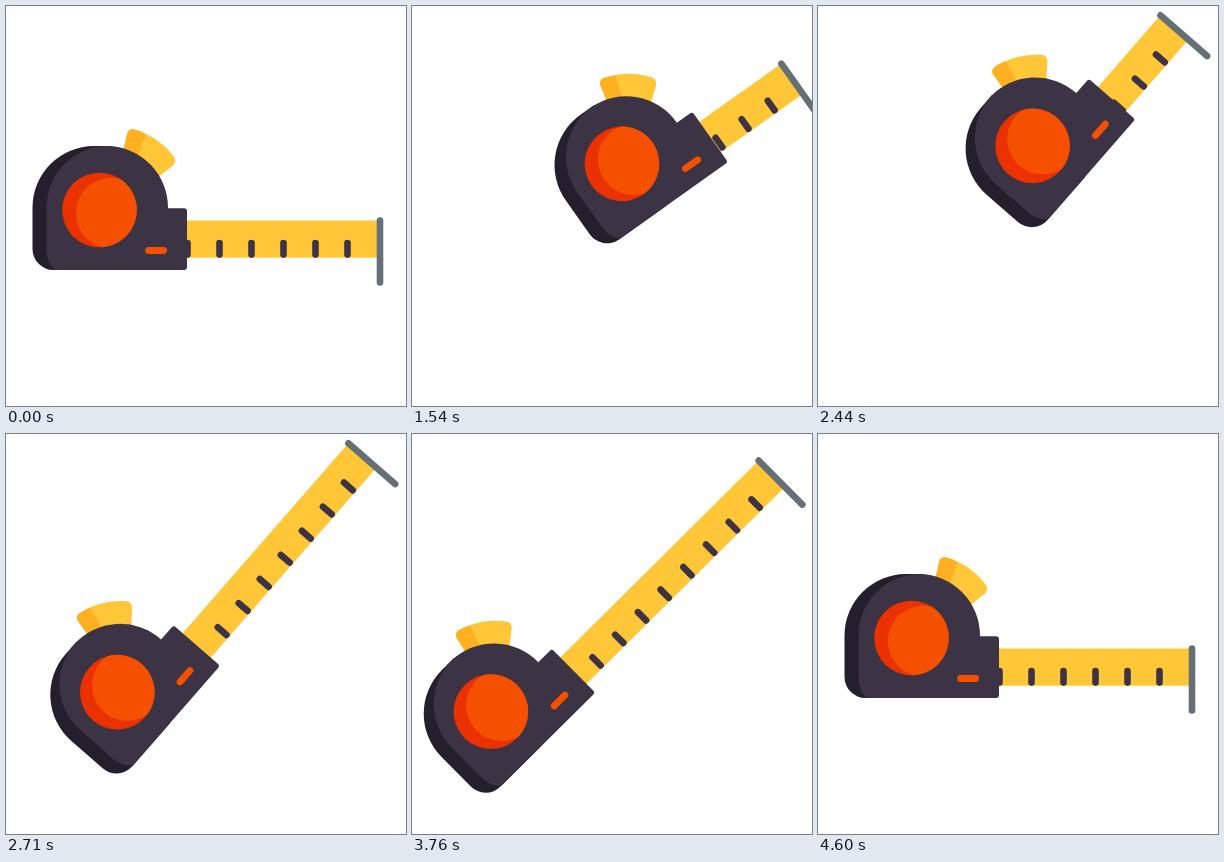
An HTML page that plays this animation: 400 by 400 pixels, repeating every 4.63 s.

```html
<!DOCTYPE html>
<html lang="en">
<head>
<meta charset="utf-8">
<title>Tape measure</title>
<style>
html, body { margin: 0; width: 100%; height: 100%; overflow: hidden; background: #fff; }
svg { display: block; width: 100vw; height: 100vh; }
.round { stroke-linecap: round; fill: none; }
</style>
</head>
<body>
<svg viewBox="0 0 400 400">
  <g id="tool">
    <rect id="tape" y="214.5" width="200" height="37.2" fill="#ffc738"/>
    <g id="ticks" class="round" stroke="#3c3345" stroke-width="6.6"></g>
    <path class="round" d="M374 214.5V276.5" stroke="#646f76" stroke-width="6.6"/>
    <g id="case">
      <path fill="#ffc738" d="M116 150L121.3 127.5Q123 122.3 128.5 123.6Q153 131 168 151Q171 155 167 159.5L150 173Z"/>
      <path fill="#ffb020" d="M116 150L121.3 127.5Q123 122.3 128.5 123.6Q134 125 139.5 128.2L132 150Z"/>
      <path fill="#231f2d" d="M26.5 201.5A61.5 61.5 0 0 1 88 140H105V264H47.5A21 21 0 0 1 26.5 243Z"/>
      <path fill="#3c3345" d="M40.5 201.5A61.5 61.5 0 0 1 101 140A61.5 61.5 0 0 1 162 202.3H178Q181 202.3 181 205.3V261Q181 264 178 264H49C44 260 40.5 253 40.5 243Z"/>
      <circle cx="93.5" cy="204" r="37.3" fill="#eb3100"/>
      <path fill="#f54f00" d="M114 172.8A35.2 35.2 0 0 0 70 207A35.2 35.2 0 0 0 96 241.2A37.3 37.3 0 0 0 114 172.8Z"/>
      <path class="round" d="M142.6 244.5H157.6" stroke="#f54f00" stroke-width="6.8"/>
    </g>
  </g>
</svg>
<script>
const $ = id => document.getElementById(id);
const tool = $('tool'), tape = $('tape'), box = $('case');
const LOOP = 4630, HOLD = 1000, STEP = 30;
const TILT = 48.9, REST = 280.5, SHORT = 152.5, LONG = 395.5;
const LOW = [374, 214], HIGH = [342, 9];

const ticks = Array.from({ length: 10 }, (_, i) => {
  const p = document.createElementNS('http://www.w3.org/2000/svg', 'path');
  const x = 341.5 - 32 * i;
  p.setAttribute('d', `M${x} 237V248.6`);
  $('ticks').append(p);
  return { p, x };
});

const mix = (a, b, f) => a + (b - a) * f;

// Bezier easing with handles (x1, 0) and (x2, 1)
function ease(n, start, x1, x2) {
  const t = Math.min(1, Math.max(0, (n - start) / 40));
  if (t === 0 || t === 1) return t;
  let lo = 0, hi = 1, u = 0.5;
  for (let i = 0; i < 30; i++) {
    u = (lo + hi) / 2;
    const v = 1 - u;
    if (3 * u * v * v * x1 + 3 * u * u * v * x2 + u * u * u < t) lo = u; else hi = u;
  }
  return u * u * (3 - 2 * u);
}

// Straight move of the hook with a sideways bulge
function arc(a, b, f, bulge) {
  return a.map((v, i) => mix(v, b[i], f) + bulge[i] * 4 * f * (1 - f));
}

function pose(n) {
  if (n < 40) {
    const f = ease(n, 0, 0.5, 0.12);
    return { hook: arc(LOW, HIGH, f, [22.7, -10.7]), tilt: TILT * f, len: mix(REST, SHORT, f) };
  }
  if (n < 80) {
    return { hook: HIGH, tilt: TILT, len: mix(SHORT, LONG, ease(n, 40, 0.47, 0.01)) };
  }
  const f = ease(n, 80, 0.75, 0.3);
  return {
    hook: arc(HIGH, LOW, f, [5.3, 0]),
    tilt: TILT * (1 - f),
    len: mix(LONG, REST, ease(n, 80, 0.47, 0.265))
  };
}

function draw(ms) {
  const n = Math.max(0, Math.floor((ms % LOOP - HOLD) / STEP));
  const { hook, tilt, len } = pose(n);
  const slide = REST - len;
  tool.setAttribute('transform',
    `translate(${hook[0]} ${hook[1]}) rotate(${-tilt}) translate(${-LOW[0]} ${-LOW[1]})`);
  box.setAttribute('transform', `translate(${slide} 0)`);
  tape.setAttribute('x', 165 + slide);
  tape.setAttribute('width', 209 - slide);
  for (const { p, x } of ticks) p.style.display = x > 170 + slide ? '' : 'none';
}

const begin = performance.now();
function loop() {
  draw(performance.now() - begin);
  requestAnimationFrame(loop);
}
loop();
</script>
</body>
</html>
```
